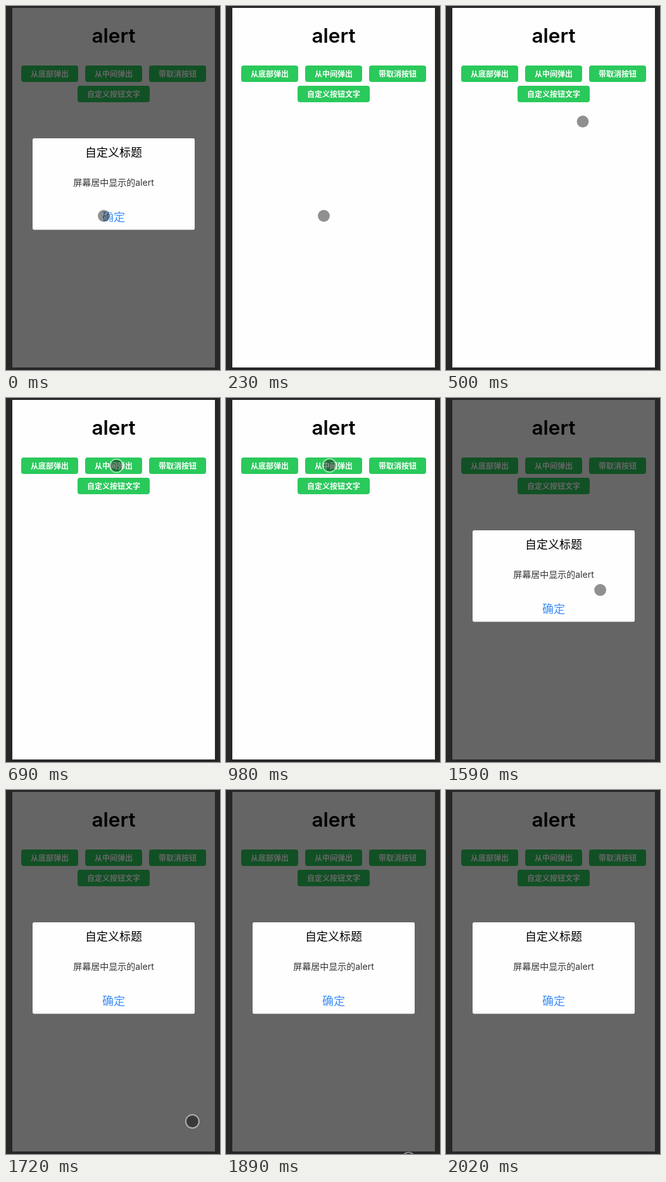
Animation, 338 px wide and 575 px high, one loop 2460 ms. Source, as an HTML page:

```html
<!DOCTYPE html>
<html lang="zh-CN">
<head>
<meta charset="utf-8">
<title>alert</title>
<style>
html, body { margin: 0; width: 100%; height: 100%; overflow: hidden; background: #272727; }
svg { display: block; width: 338px; height: 575px; }
text { font-family: Inter, "Noto Sans CJK SC", "Noto Sans CJK", sans-serif; text-anchor: middle; }
.label { font-size: 12px; font-weight: 700; fill: #fff; }
</style>
</head>
<body>
<svg viewBox="0 0 338 575">
  <rect width="338" height="575" fill="#272727"/>
  <rect x="10" y="3" width="320" height="568" fill="#fefefe"/>
  <text x="170" y="58" font-size="31.5" font-weight="600">alert</text>
  <g id="buttons"></g>
  <g id="modal">
    <rect x="10" y="3" width="320" height="568" fill="#000" fill-opacity=".6"/>
    <rect x="42" y="209" width="256" height="144.5" rx="2.5" fill="#fefefe"/>
    <text x="170" y="238" font-size="18">自定义标题</text>
    <text x="170" y="284" font-size="14" fill="#333">屏幕居中显示的alert</text>
    <text x="170" y="340" font-size="18" fill="#3d8df5">确定</text>
  </g>
  <g id="cursor">
    <circle r="9.5" fill="#000" fill-opacity=".43"/>
    <circle r="10.5" fill="none" stroke="#fff" stroke-opacity=".47" stroke-width="2"/>
  </g>
</svg>
<script>
const LOOP = 2460, STEP = 30;
const CLOSE = 230, OPEN = 1360;
const modal = document.getElementById('modal');
const cursor = document.getElementById('cursor');

function addButton(x, y, width, label) {
  document.getElementById('buttons').innerHTML +=
    `<rect x="${x}" y="${y}" width="${width}" height="26" rx="4" fill="#2ac95b"/>
     <text class="label" x="${x + width / 2}" y="${y + 17.5}">${label}</text>`;
}
['从底部弹出', '从中间弹出', '带取消按钮'].forEach((label, i) => addButton(24 + 101 * i, 94, 90, label));
addButton(113, 126, 114, '自定义按钮文字');

// each glide is a Bézier arc that slows towards its end
const toButton = {
  begin: 350, end: 710, power: 1.286,
  x: [154.5, 212, 258, 163.5], y: [331.5, 235, 106, 106.5]
};
const offStage = {
  begin: 1480, end: 2020, power: 2.74,
  x: [163.5, 225, 327, 285], y: [106.5, 225, 518, 590]
};

function bezier([a, b, c, d], u) {
  const v = 1 - u;
  return v * v * v * a + 3 * v * v * u * b + 3 * v * u * u * c + u * u * u * d;
}

function locate(t) {
  const glide = t < offStage.begin ? toButton : offStage;
  const { begin, end, power, x, y } = glide;
  const beat = Math.floor((t - begin) / STEP) * STEP;
  const p = Math.min(1, Math.max(0, beat / (end - begin)));
  const u = 1 - Math.pow(1 - p, power);
  return [bezier(x, u), bezier(y, u)];
}

function draw(t) {
  const [x, y] = locate(t);
  cursor.setAttribute('transform', `translate(${x} ${y})`);
  modal.setAttribute('visibility', t < CLOSE || t >= OPEN ? 'visible' : 'hidden');
}

const start = performance.now();
function tick() {
  draw((performance.now() - start) % LOOP);
  requestAnimationFrame(tick);
}
draw(0);
requestAnimationFrame(tick);
</script>
</body>
</html>
```
